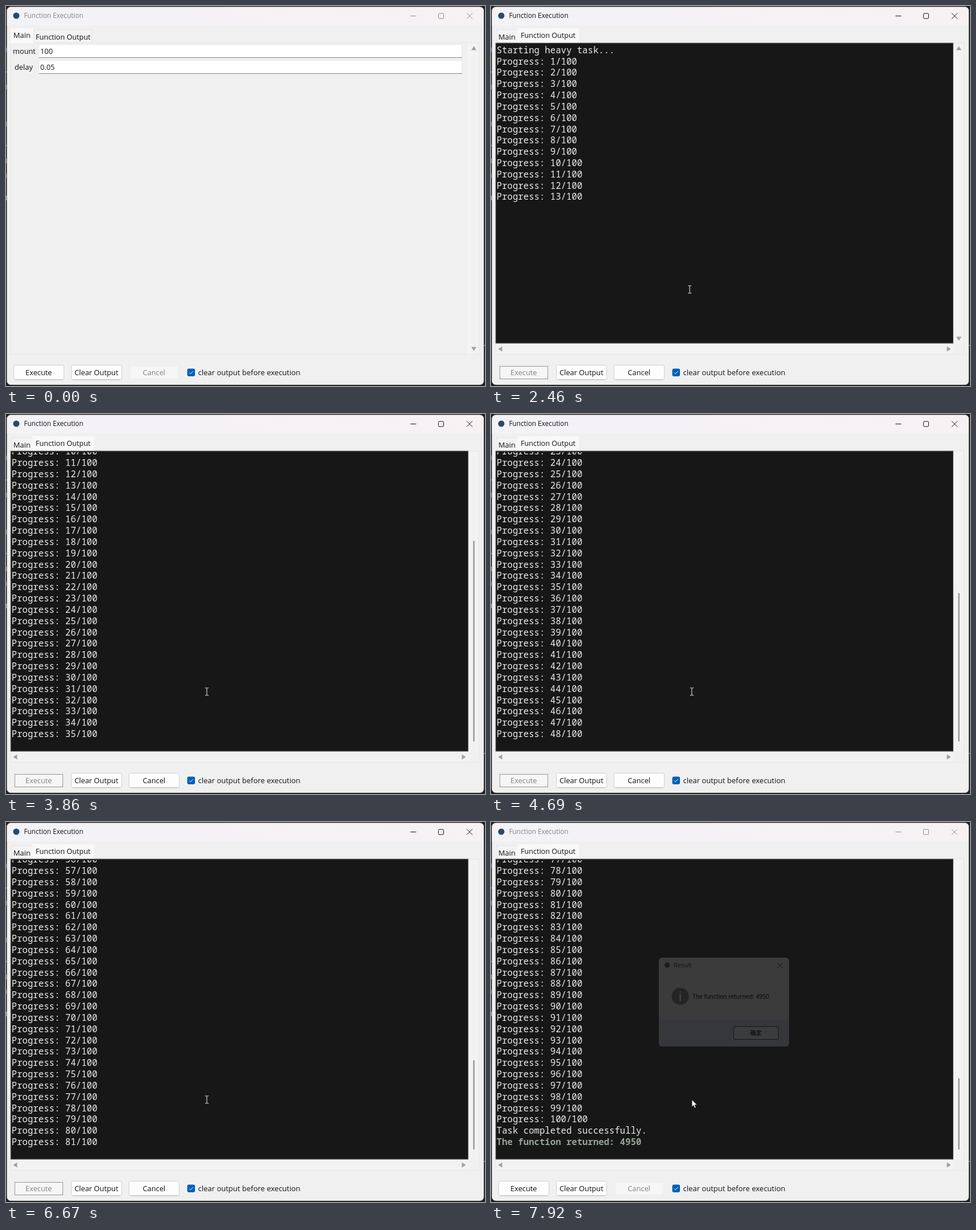
Recreate the animation shown at these times as an HTML page. Size 839 by 667 pixels, loop 7990 ms.

```html
<!DOCTYPE html>
<html lang="en">
<head>
<meta charset="utf-8">
<title>Function Execution</title>
<style>
html, body { margin: 0; width: 100%; height: 100%; overflow: hidden; background: #202020; }
svg { display: block; width: 839px; height: 667px; }
text { font: 12.8px "Open Sans", "Noto Sans", sans-serif; fill: #111; white-space: pre; }
.mid { text-anchor: middle; }
.tab-wide { font-size: 12.6px; }
.title { font-size: 11.75px; }
.btn rect { fill: #fdfdfd; stroke: #d0d0d0; }
.btn .base { stroke: #bababa; fill: none; }
.btn .focus { fill: none; stroke: none; }
.btn.off rect { fill: #f6f6f6; stroke: #ebebeb; }
.btn.off .base { stroke: none; }
.btn.off text { fill: #838383; }
.btn.hot rect { fill: #e0eef9; stroke: #0078d4; }
.btn.down rect { fill: #c8dff4; stroke: #145390; }
.btn.hot .base, .btn.down .base { stroke: none; }
.btn.down rect.focus, .btn.off.held rect.focus { fill: none; stroke: #333; stroke-dasharray: 1 1; }
.chrome { fill: none; stroke: #111; }
.idle .chrome { stroke: #8c8c8c; }
.idle .title { fill: #858585; }
.arrow { fill: #a0a0a0; }
#log text { font: 15.66px "Noto Sans Mono", "DejaVu Sans Mono", monospace; fill: #ececec; }
#log text.result { font-weight: 700; fill: #96a296; }
#dialog text { fill: #121212; font-size: 10.3px; }
#dialog text.ok { font: 700 10px "Noto Sans CJK SC", "Noto Sans CJK", sans-serif; }
</style>
</head>
<body>
<svg viewBox="0 0 839 667">
  <defs>
    <linearGradient id="mica"><stop offset="0" stop-color="#f3f2f7"/><stop offset="1" stop-color="#f7f1f4"/></linearGradient>
    <clipPath id="frame"><rect x="1.5" y="1.5" width="835.5" height="663.5" rx="7"/></clipPath>
    <clipPath id="view"><rect x="9" y="67" width="800" height="524"/></clipPath>
  </defs>

  <rect width="839" height="667" fill="#202020"/>
  <g id="specks"></g>

  <g clip-path="url(#frame)">
    <rect width="839" height="667" fill="#f0f0f0"/>
    <rect width="839" height="34" fill="url(#mica)"/>
  </g>
  <rect x="1.5" y="1.5" width="835.5" height="663.5" rx="7" fill="none" stroke="#777" stroke-opacity=".5"/>

  <g id="bar">
    <circle cx="18" cy="17" r="5.5" fill="#2b4a66"/>
    <text class="title" x="31.5" y="21.3">Function Execution</text>
    <path class="chrome" d="M708.5 17.5h10M807 12.5l10 10M817 12.5l-10 10"/>
    <rect class="chrome" x="757.5" y="13" width="9" height="9" rx="1.5"/>
  </g>

  <g id="form">
    <rect x="8.5" y="64.5" width="820" height="547" fill="none" stroke="#e7e7e7"/>
    <rect x="48.5" y="41.5" width="102" height="23" fill="#f3f3f3" stroke="#e5e5e5"/>
    <path d="M8 65V39h40v26z" fill="#f9f9f9"/>
    <text x="13" y="56.3">Main</text>
    <text class="tab-wide" x="52" y="58.5">Function Output</text>
    <rect x="811" y="66" width="17" height="545" fill="#f2f2f2"/>
    <path d="M810.5 65v546" stroke="#fafafa" stroke-width="1.5"/>
    <path class="arrow" d="M815 77.5h9l-4.5-7zM815 598.5h9l-4.5 7z"/>
    <g id="fields"></g>
  </g>

  <g id="output">
    <rect x="8.5" y="64.5" width="820" height="547" fill="none" stroke="#e7e7e7"/>
    <rect x="10.5" y="41.5" width="36" height="23" fill="#f3f3f3" stroke="#e5e5e5"/>
    <path d="M46 65V39h108v26z" fill="#f9f9f9"/>
    <text x="13" y="58.5">Main</text>
    <text class="tab-wide" x="52" y="56.3">Function Output</text>
    <rect x="811" y="66" width="17" height="526" fill="#f2f2f2"/>
    <rect x="9" y="593" width="801" height="18" fill="#f2f2f2"/>
    <rect x="8.2" y="65" width="801.3" height="527" fill="#171717" stroke="#686868"/>
    <path class="arrow" d="M19.5 597.5v9l-7-4.5zM798.5 597.5v9l7-4.5z"/>
    <path class="arrow" id="ends" d="M815 77.5h9l-4.5-7zM815 580.5h9l-4.5 7z"/>
    <rect id="thumb" x="818.5" width="2" rx="1" fill="#858585"/>
    <g clip-path="url(#view)"><g id="log"></g></g>
  </g>

  <g id="buttons"></g>
  <rect x="317.5" y="636.5" width="13.5" height="13.5" rx="3" fill="#005fb8"/>
  <path d="M321 643.4l2.2 2.2 4.4-4.6" fill="none" stroke="#fff"/>
  <text x="336.5" y="647.6" style="font-size:13px">clear output before execution</text>

  <g id="dialog">
    <rect x="294" y="238" width="228" height="156" rx="6" fill="#3b3b3b"/>
    <path d="M294 347h228v41a6 6 0 0 1-6 6H300a6 6 0 0 1-6-6z" fill="#35373a"/>
    <circle cx="308.5" cy="251" r="4.5" fill="#191d21"/>
    <text x="320" y="255" style="font-size:10.8px">Result</text>
    <path d="M502 247.5l9 9M511 247.5l-9 9" stroke="#121212" fill="none"/>
    <circle cx="331.5" cy="306" r="15" fill="#242424"/>
    <path d="M331.5 297v2.6M331.5 302.5v12" stroke="#444" stroke-width="2.4"/>
    <text x="353" y="310" style="stroke:#121212;stroke-width:.25px">The function returned: 4950</text>
    <rect x="425" y="359" width="78.5" height="22.5" rx="3" fill="#3b3c3d" stroke="#151515"/>
    <text class="mid ok" x="464.3" y="374">确定</text>
  </g>

  <path id="beam" d="M-3 -6.5h2.2l.8.7.8-.7h2.2M0 -6v12M-3 6.5h2.2l.8-.7.8.7h2.2" fill="none" stroke="#f0f0f0"/>
  <path id="pointer" d="M0 0V13l3-2.8 2 4.8 2.3-1-2-4.6H9.4z" fill="#fff" stroke="#111" stroke-width=".9"/>
</svg>

<script>
const LOOP = 7990, PITCH = 19.83, TOTAL = 100;
const $ = id => document.getElementById(id);
const clamp = v => Math.min(1, Math.max(0, v));
const mix = (a, b, p) => a + (b - a) * p;
const show = (id, on) => { $(id).style.display = on ? '' : 'none'; };

function add(parent, tag, attrs, text) {
  const el = document.createElementNS('http://www.w3.org/2000/svg', tag);
  for (const key in attrs) el.setAttribute(key, attrs[key]);
  if (text) el.textContent = text;
  parent.appendChild(el);
  return el;
}

// code editor peeking out behind the window
[[77, '#4c7fc4'], [115, '#bbb'], [142, '#6878c8'], [207, '#6878c8'], [244, '#bbb'],
 [272, '#a08a45'], [298, '#8a6258'], [337, '#aaa']].forEach(([y, fill]) => {
  const dash = fill === '#bbb';
  add($('specks'), 'rect', { x: 0, y: dash ? y : y - 4, width: 1.4, height: dash ? 1.5 : 8, fill });
});
add($('specks'), 'rect', { x: 837.4, y: 595, width: 1.6, height: 1.5, fill: '#aaa' });

function field(y, label, x, value) {
  const g = $('fields');
  add(g, 'rect', { x: 57.5, y: y + .5, width: 741, height: 23, rx: 2, fill: '#fff', stroke: '#e6e6e6' });
  add(g, 'path', { d: `M58 ${y + 23.5}h741`, stroke: '#868686' });
  add(g, 'text', { x, y: y + 16.5 }, label);
  add(g, 'text', { x: 60, y: y + 16.5 }, value);
}
field(67, 'mount', 12, '100');
field(95, 'delay', 15, '0.05');

function button(x, label) {
  const g = add($('buttons'), 'g', { class: 'btn' });
  add(g, 'rect', { x: x + .5, y: 630.5, width: 88, height: 25.5, rx: 3 });
  add(g, 'path', { class: 'base', d: `M${x + 3} 656h83` });
  add(g, 'rect', { class: 'focus', x: x + 2.5, y: 632.5, width: 84, height: 22 });
  add(g, 'text', { class: 'mid', x: x + 44.3, y: 647.6 }, label);
  return g;
}
const execute = button(13, 'Execute');
button(114, 'Clear Output');
const cancel = button(215, 'Cancel');

const lines = Array.from({ length: TOTAL + 3 }, (_, i) => add($('log'), 'text',
  { x: 9.8, y: 82.7 + i * PITCH, class: i === TOTAL + 2 ? 'result' : '' },
  i === 0 ? 'Starting heavy task...'
    : i <= TOTAL ? `Progress: ${i}/${TOTAL}`
    : i === TOTAL + 1 ? 'Task completed successfully.'
    : 'The function returned: 4950'));

function cursorAt(t, k) {
  if (t < 1290) {
    const p = clamp(Math.floor((t - 340) / 70) / 6);
    const e = 1 - (1 - p) ** 2;
    return [mix(117, 84.5, e), mix(661, 639.5, e)];
  }
  if (k < 12) {
    const p = clamp((k - 2) / 10);
    const e = p * p * (3 - 2 * p);
    return [mix(85, 348, e), mix(640, 497.5, e)];
  }
  const p = clamp((k - 12) / 2);
  return [mix(348, 351.8, p), mix(497.5, 487.3, p)];
}

function draw(t) {
  // k counts the screen refreshes since the button press
  const k = t < 1620 ? -1 : Math.floor((t - 1620) / 69.3 + .15);
  const running = k >= 2, done = k >= 91;
  const n = done ? TOTAL + 2 : Math.min(TOTAL, Math.floor(13.1 + (k - 12) * 1.115));

  show('form', !running);
  show('output', running);
  show('dialog', done);
  $('bar').setAttribute('class', k < 0 || done ? 'idle' : '');

  if (running) {
    lines.forEach((el, i) => { el.style.display = i <= n ? '' : 'none'; });
    const full = n >= 25;
    $('log').setAttribute('transform', `translate(0 ${full ? 484.4 - n * PITCH : 0})`);
    show('ends', !full);
    show('thumb', full);
    const length = 492 * 26.5 / (n + 2);
    $('thumb').setAttribute('y', 575 - length);
    $('thumb').setAttribute('height', length);
  }

  const [x, y] = cursorAt(t, k);
  const over = t >= 340 && x < 102 && y < 657;
  execute.setAttribute('class', 'btn ' + (done ? '' : running ? 'off held' : k >= 0 ? 'down' : over ? 'hot' : ''));
  cancel.setAttribute('class', running && !done ? 'btn' : 'btn off');

  const typing = running && !done && y < 591;
  show('beam', typing);
  show('pointer', t >= 340 && !typing);
  $('beam').setAttribute('transform', `translate(${x} ${y})`);
  $('pointer').setAttribute('transform', `translate(${x} ${y})`);
}

function tick() {
  draw(performance.now() % LOOP);
  requestAnimationFrame(tick);
}
tick();
</script>
</body>
</html>
```
